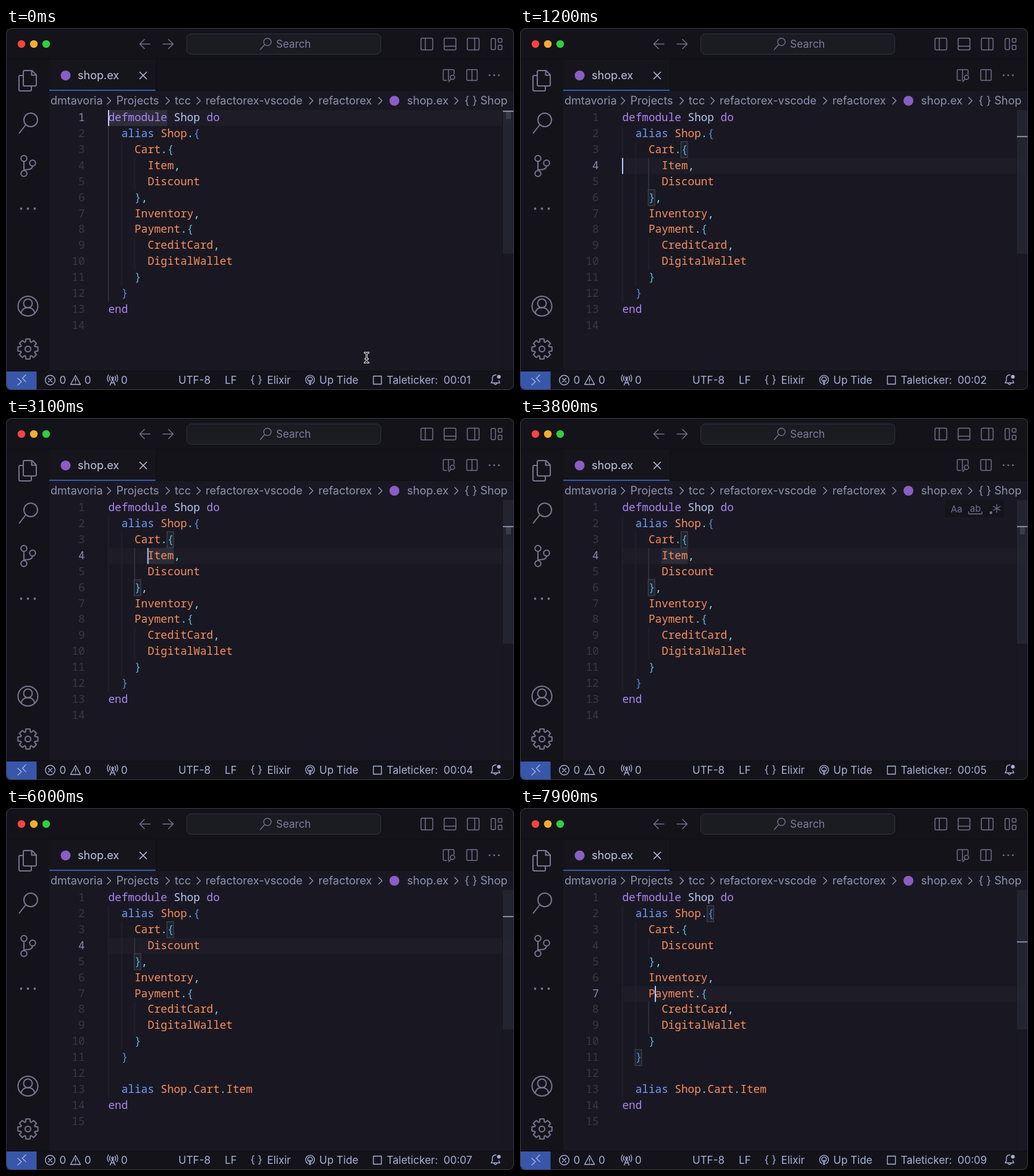
Animation of 822x587 px, one loop 8 s. Source, as an HTML page:

```html
<!DOCTYPE html>
<html lang="en">
<head>
<meta charset="utf-8">
<title>Editor</title>
<style>
  html, body { margin: 0; width: 100%; height: 100%; overflow: hidden; background: #0a0a0d; }
  svg { display: block; width: 822px; height: 587px; }
  text { white-space: pre; font-family: Inter, Roboto, sans-serif; }
  .mono text { font: 17.68px "Noto Sans Mono", "DejaVu Sans Mono", monospace; }
  .num { fill: #363748; text-anchor: end; }
  .num.on { fill: #8b87b2; }
  .key { fill: #ad86f3; }
  .dir { fill: #729df5; }
  .mod { fill: #fb8f5d; }
  .name { fill: #bcc5f3; }
  .punct { fill: #82dcfb; }
  .b0 { fill: #5f86d6; }
  .b1 { fill: #5fb2e0; }
  .line { fill: none; stroke-linecap: round; stroke-linejoin: round; }
  .crumb { font-size: 18px; fill: #8f93b0; }
  .stat { font-size: 17px; fill: #a9b0d6; }
</style>
</head>
<body>
<svg viewBox="0 0 822 587" xmlns="http://www.w3.org/2000/svg">
  <rect width="822" height="587" rx="10" fill="#14131a"/>
  <rect x="70" y="102" width="752" height="454" fill="#191822"/>
  <path d="M0 50.5H822M243.5 51V101M70 101.5H822M0 556H822" stroke="#0f0f14"/>
  <rect x="70" y="51" width="172" height="50" fill="#16151c"/>
  <rect x="70" y="100" width="172" height="2" fill="#3857ab"/>

  <!-- title bar -->
  <circle cx="25" cy="26" r="6.2" fill="#f8443f"/>
  <circle cx="45" cy="26" r="6.2" fill="#f1ae30"/>
  <circle cx="65" cy="26" r="6.2" fill="#2fcf3e"/>
  <rect x="292.5" y="9.5" width="314" height="33" rx="7" fill="#1b1b22" stroke="#33333f"/>
  <text x="437" y="32" font-size="17" fill="#7b7f99">Search</text>
  <g class="line" stroke="#706f87" stroke-width="1.5">
    <path d="M233 26H216.500M224 18.500L216.500 26L224 33.500M254 26H270.500M263 18.500L270.500 26L263 33.500"/>
    <circle cx="423" cy="22.500" r="6"/><path d="M418.500 27L411.500 35"/>
    <rect x="671.500" y="16.500" width="19" height="19" rx="2"/><path d="M678.500 16.500V35.500"/>
    <rect x="709" y="16.500" width="19" height="19" rx="2"/><path d="M709 29.500H728"/>
    <rect x="746.500" y="16.500" width="19" height="19" rx="2"/><path d="M758.500 16.500V35.500"/>
    <rect x="785" y="17" width="7" height="18" rx="1.500"/>
    <rect x="796.500" y="17" width="6" height="6" rx="1"/><rect x="796.500" y="28" width="6" height="7" rx="1"/>
    <path d="M713 85H709Q707.500 85 707.500 83.500V69Q707.500 67.500 709 67.500H723.500Q725 67.500 725 69V75M716 67.500V85"/>
    <circle cx="722.500" cy="80" r="3.500"/><path d="M720 83L716.500 87"/>
    <rect x="745.500" y="67.500" width="17" height="17.500" rx="1.500"/><path d="M754 67.500V85"/>
  </g>
  <g fill="#706f87"><circle cx="782.500" cy="76.500" r="1.500"/><circle cx="790" cy="76.500" r="1.500"/><circle cx="797.500" cy="76.500" r="1.500"/></g>

  <!-- tab and path -->
  <circle cx="96.500" cy="77" r="8" fill="#8a5ec4"/>
  <text x="116" y="83" font-size="18" fill="#c0c5e2">shop.ex</text>
  <g id="path"></g>
  <circle cx="628.500" cy="118" r="8" fill="#8a5ec4"/>

  <!-- activity bar -->
  <g class="line" stroke="#77758e" stroke-width="2">
    <path d="M30 69H42L49 76V92Q49 94 47 94H30Q28 94 28 92V71Q28 69 30 69ZM41.500 69V76.500H49M28 77H23Q21 77 21 79V100Q21 102 23 102H39Q41 102 41 100V94"/>
    <circle cx="40" cy="149" r="11"/><path d="M32 157L21.500 170.500"/>
    <circle cx="29" cy="211.500" r="4.800"/><circle cx="29" cy="236" r="4.800"/><circle cx="43" cy="219" r="4.800"/>
    <path d="M29 216.500V231M43 224Q42 229.500 35 229.500Q30 229.500 29 231"/>
    <circle cx="35.500" cy="451" r="16"/><circle cx="35.500" cy="446.500" r="7"/>
    <path d="M24.500 462.500Q26 453.500 35.500 453.500Q45 453.500 46.500 462.500"/>
    <path id="gear"/><circle cx="35.500" cy="520.500" r="4.500"/>
  </g>
  <g fill="#77758e"><circle cx="24.500" cy="293" r="1.900"/><circle cx="35.500" cy="293" r="1.900"/><circle cx="46.500" cy="293" r="1.900"/></g>

  <!-- status bar -->
  <path d="M0 557H49.500V587H10Q0 587 0 577Z" fill="#3857ab"/>
  <g class="line" stroke="#a9b0d6" stroke-width="1.400">
    <path d="M19 568L25 573.500L19 579M32 562.500L26.500 568L32 573.500"/>
    <circle cx="71.500" cy="571" r="7.800"/><path d="M68.500 568L74.500 574M74.500 568L68.500 574"/>
    <path d="M112.500 563.500L120.500 578H104.500ZM112.500 568.500V573M112.500 575.500V575.600"/>
    <path d="M172.500 569L168.500 579M172.500 569L176.500 579M170 575.500H175M168.500 571.500Q166.500 568 168.500 564.500M176.500 571.500Q178.500 568 176.500 564.500M165.800 573.500Q162.500 568 165.800 562.500M179.200 573.500Q182.500 568 179.200 562.500"/>
    <circle cx="172.500" cy="567.500" r="1.500"/>
    <path d="M488.300 576.500A7.200 7.200 0 1 1 495.700 576.500M489.500 572.500A3.800 3.800 0 1 1 494.500 572.500"/>
    <path d="M491 571.500H493V578H491Z"/>
    <rect x="594.500" y="564.500" width="13" height="13"/>
    <path d="M793 562.500Q787 562.500 787 568V572L785 575.500H799L797.500 572M789.500 576Q792 580.500 794.500 576"/>
  </g>
  <circle cx="797.500" cy="565.500" r="3" fill="#a9b0d6"/>
  <g id="status"></g>
  <text id="clock" class="stat" x="708" y="577"></text>

  <g id="editor" class="mono"></g>
  <g id="find">
    <rect x="688" y="133" width="95" height="28" fill="#15141b"/>
    <g fill="#6f7190" font-size="15">
      <text x="697" y="153">Aa</text><text x="728" y="152">ab</text>
      <rect x="760" y="151.500" width="4" height="4"/>
    </g>
    <path class="line" stroke="#6f7190" stroke-width="1.300" d="M726 152V155.500H747.500V152M771.500 140V153M766 143.300L777 149.700M777 143.300L766 149.700"/>
  </g>
  <path id="close" class="line" stroke="#b8bedc" stroke-width="1.500" d="M216.500 71.500L227.500 82.500M227.500 71.500L216.500 82.500"/>
  <g id="dirty"><circle cx="222" cy="76.500" r="5.500" fill="#c0c5e2"/><circle cx="25" cy="26" r="2.300" fill="#7c0d0a"/></g>
  <g id="badge"><circle cx="47.500" cy="97.500" r="11.300" fill="#3857ab"/>
    <text x="47.500" y="102.300" font-size="13" font-weight="600" fill="#fff" text-anchor="middle">1</text></g>
  <g id="mouse" class="line">
    <path d="M580.500 526.500Q583.500 526.500 583.500 529V540Q583.500 542.500 580.500 542.500M586.500 526.500Q583.500 526.500 583.500 529M583.500 540Q583.500 542.500 586.500 542.500M581.500 536.500H585.500" stroke="#fff" stroke-width="3"/>
    <path d="M580.500 526.500Q583.500 526.500 583.500 529V540Q583.500 542.500 580.500 542.500M586.500 526.500Q583.500 526.500 583.500 529M583.500 540Q583.500 542.500 586.500 542.500M581.500 536.500H585.500" stroke="#111" stroke-width="1.200"/>
  </g>
  <rect x=".5" y=".5" width="821" height="586" rx="10" fill="none" stroke="#3b3b43"/>
</svg>
<script>
(() => {
const $ = id => document.getElementById(id);
const LOOP = 8000, X0 = 165.5, Y0 = 133, CW = 10.608, LH = 25.92;

const before = `defmodule Shop do
  alias Shop.{
    Cart.{
      Item,
      Discount
    },
    Inventory,
    Payment.{
      CreditCard,
      DigitalWallet
    }
  }
end
`.split("\n");
const after = before.filter(s => s.trim() !== "Item,");
after.splice(11, 0, "", "  alias Shop.Cart.Item");

// time, line, column; column -1 is the blink's off phase
const moves = [
  [0, 1, 0], [200, 2, 0], [300, 3, 0], [400, 4, 0], [600, 5, 0], [1100, 4, 0],
  [1600, 4, -1], [1800, 4, 1], [1900, 4, 2], [2000, 4, 4], [2200, 4, 5], [2700, 4, -1],
  [2800, 4, 6], [3200, 4, 10], [3600, 4, -1], [4500, 4, 0], [5000, 4, -1], [5500, 4, 0],
  [6000, 4, -1], [6400, 5, 0], [6700, 6, 0], [7100, 7, 0], [7300, 7, 1], [7500, 7, 2],
  [7600, 7, 3], [7800, 7, 4], [7900, 7, 5]
];

const rowY = n => Y0 + (n - 1) * LH;
const colX = c => X0 + c * CW;
const box = (x, y, w, h, style) => `<rect x="${x}" y="${y}" width="${w}" height="${h}" ${style}/>`;

function indents(doc) {
  return doc.map((s, i) => s ? s.search(/\S/) : i < doc.length - 1 ? 2 : 0);
}

function guides(doc, line) {
  const ind = indents(doc), i = line - 1, m = ind[i];
  let level, from, to;
  if (ind[i + 1] > m) {
    level = m / 2; from = to = i + 1;
  } else if (ind[i - 1] > m) {
    level = m / 2; from = to = i - 1;
  } else {
    level = m / 2 - 1; from = to = i;
  }
  while (ind[from - 1] > level * 2) from--;
  while (ind[to + 1] > level * 2) to++;
  let out = "";
  ind.forEach((n, r) => {
    for (let k = 0; k < n / 2; k++) {
      const on = k === level && r >= from && r <= to;
      out += box(colX(k * 2) - .3, rowY(r + 1), 1.2, LH, `fill="${on ? "#3a3b50" : "#242430"}"`);
    }
  });
  return out;
}

// innermost pair of braces around the caret
function brackets(doc, line, col) {
  const open = [], at = line * 100 + col;
  let best = null;
  doc.forEach((s, r) => [...s].forEach((ch, c) => {
    const p = (r + 1) * 100 + c;
    if (ch === "{") open.push(p);
    if (ch === "}") {
      const o = open.pop();
      if (!best && o < at && at <= p) best = [o, p];
    }
  }));
  return (best || []).map(p => box(colX(p % 100) - .5, rowY(Math.floor(p / 100)) - .5, CW, LH,
    'fill="#20222c" stroke="#4a4c5e"')).join("");
}

function code(doc, line) {
  let depth = 0;
  const paint = (s, r) => s.replace(/\w+|[{}.,]/g, w => {
    let cls = "punct";
    if (w === "{") cls = "b" + depth++;
    else if (w === "}") cls = "b" + --depth;
    else if (w === "alias") cls = "dir";
    else if (/^[a-z]/.test(w)) cls = "key";
    else if (/^[A-Z]/.test(w)) cls = r ? "mod" : "name";
    return `<tspan class="${cls}">${w}</tspan>`;
  });
  return doc.map((s, r) => {
    const y = rowY(r + 1) + 18;
    return `<text class="num${r + 1 === line ? " on" : ""}" x="127.6" y="${y}">${r + 1}</text>` +
      `<text x="${X0}" y="${y}">${paint(s, r)}</text>`;
  }).join("");
}

function editor(t) {
  const doc = t < 4500 ? before : after;
  const past = moves.filter(m => m[0] <= t);
  const [, line, col] = past[past.length - 1];
  const spot = past.filter(m => m[2] >= 0).pop()[2];
  const mark = 134 + (line - 1) * 13.7;
  const word = t < 200 ? [0, 9] : t >= 3000 && t < 4500 ? [6, 4] : null;
  let out = box(X0, rowY(line), 656, LH, 'fill="#1d1c27"');
  out += '<path d="M803.5 133V556" stroke="#15151c"/>';
  out += box(804, Y0, 17, t < 4500 ? 233 : 226, 'fill="#282834" opacity=".75"');
  if (word) {
    out += box(colX(word[0]), rowY(line), word[1] * CW, LH, 'fill="#2d2d3a"');
    out += box(809, mark, 8, 13.5, 'fill="#3b3b4b"');
  }
  out += box(804, mark, 17, 2, 'fill="#8b8ba5"');
  out += guides(doc, line) + brackets(doc, line, spot) + code(doc, line);
  if (col >= 0) out += box(colX(col) - .5, rowY(line), 2, LH, 'fill="#c0caf5"');
  return out;
}

const show = (id, on) => $(id).style.display = on ? "" : "none";

function draw(t) {
  $("editor").innerHTML = editor(t);
  $("clock").textContent = "00:0" + (1 + Math.floor((t + 500) / 1000));
  show("find", t >= 3200 && t < 5800);
  show("dirty", t >= 4500 && t < 4700);
  show("close", t < 4500 || t >= 4700);
  show("badge", t >= 4500 && t < 4800);
  show("mouse", t < 100);
}

const label = cls => ([x, y, s]) => `<text class="${cls}" x="${x}" y="${y}">${s}</text>`;

$("path").innerHTML = [
  [72, 124, "dmtavoria"], [178.5, 124, "Projects"], [273, 124, "tcc"], [323, 124, "refactorex-vscode"],
  [505.5, 124, "refactorex"], [649, 124, "shop.ex"], [742, 123.5, "{ }"], [767.5, 124, "Shop"]
].map(label("crumb")).join("") + [167, 262, 312, 494, 606, 729].map(x =>
  `<path class="line" stroke="#8f93b0" stroke-width="1.4" d="M${x - 3} 112.500l5.500 5.500l-5.500 5.500"/>`).join("");

$("status").innerHTML = [
  [86.5, 577, "0"], [127, 577, "0"], [186, 577, "0"], [279, 577, "UTF-8"], [354, 577, "LF"],
  [395.5, 576, "{ }"], [422.5, 577, "Elixir"], [507, 577, "Up Tide"], [616, 577, "Taleticker:"]
].map(label("stat")).join("");

const teeth = [];
for (let k = 0; k < 8; k++) {
  [[-.33, 12], [-.2, 16.5], [.2, 16.5], [.33, 12]].forEach(([d, r]) => {
    const a = k * Math.PI / 4 + d;
    teeth.push((35.5 + r * Math.cos(a)).toFixed(1) + " " + (520.5 + r * Math.sin(a)).toFixed(1));
  });
}
$("gear").setAttribute("d", "M" + teeth.join("L") + "Z");

const start = performance.now();
let last = -1;
function tick() {
  const t = Math.floor((performance.now() - start) % LOOP / 100) * 100;
  if (t !== last) draw(last = t);
  requestAnimationFrame(tick);
}
tick();
})();
</script>
</body>
</html>
```
